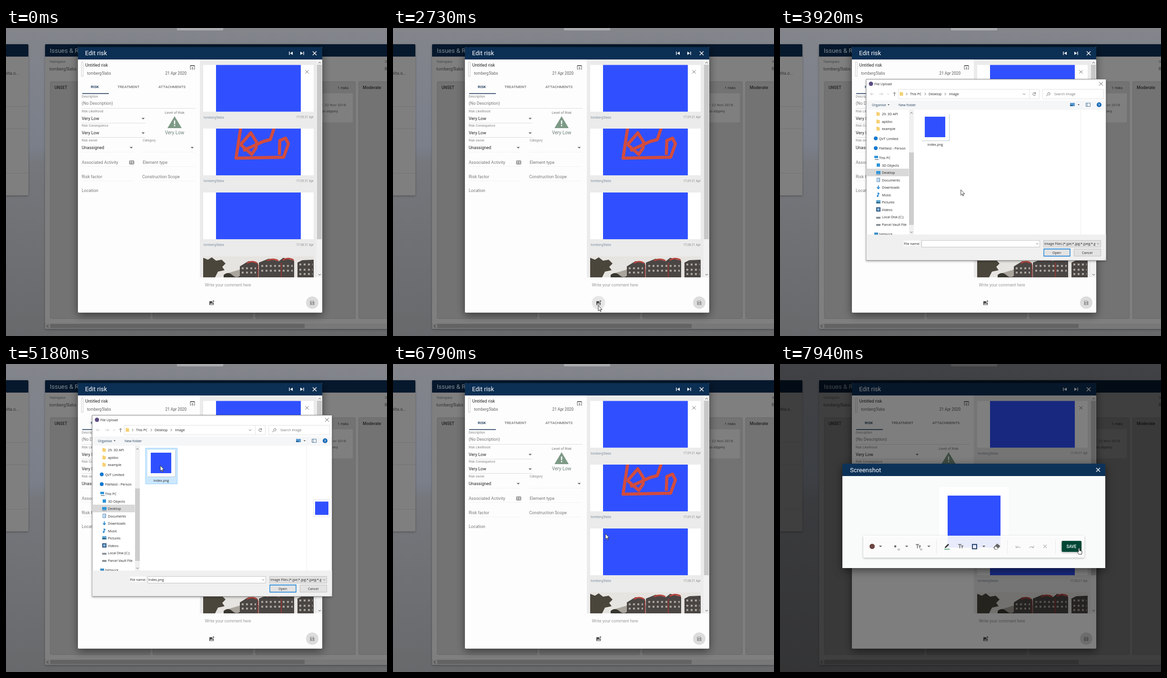
Write an HTML page that moves like this. It is 800 by 646 pixels and loops after 8000 ms.

```html
<!DOCTYPE html>
<html lang="en">
<head>
<meta charset="utf-8">
<title>Edit risk: image upload</title>
<style>
html, body { margin: 0; width: 100%; height: 100%; overflow: hidden; background: #77797f; }
svg.stage { display: block; width: 100vw; height: 100vh; }
text { font-family: Roboto, Arial, sans-serif; font-size: 9px; fill: #777; }
.h { font-size: 13px; fill: #fff; }
.lab { font-size: 6.8px; fill: #858585; }
.val { fill: #222; }
.b { font-weight: 500; }
.tab { font-size: 8px; font-weight: 500; fill: #757575; }
.by { font-size: 7px; fill: #8290a3; }
.when { font-size: 6.5px; fill: #8a8a8a; text-anchor: end; }
.os text { font-family: "Open Sans", "Noto Sans", sans-serif; font-size: 7.1px; fill: #222; }
.mid { text-anchor: middle; }
.line { fill: none; stroke: #666; stroke-width: 1; }
.rule { stroke: #dedede; }
.white { stroke: #fff; stroke-width: 1.4; fill: none; }

.dialog, .inner, .files, .hover, .picked, .halo, .focus, .tip, .scrim, .shot, .frame, .paper,
.tools, .blank, .image, .save, .arrow, .hand, .busy, .cursor {
  animation: 8s step-end infinite;
}
.dialog { animation-name: dialog; transform-origin: 433px 297px; }
.inner { animation-name: inner; }
.files { animation-name: files; }
.hover { animation-name: hover; }
.picked { animation-name: picked; }
.halo { animation-name: halo; }
.focus { animation-name: focus; }
.tip { animation-name: tip; animation-timing-function: linear; }
.scrim, .shot { animation-name: shot; }
.frame { animation-name: frame; }
.paper { animation-name: paper; }
.tools { animation-name: tools; }
.blank { animation-name: blank; }
.image { animation-name: image; }
.save { animation-name: save; }
.arrow { animation-name: arrow; }
.hand { animation-name: hand; }
.busy { animation-name: busy; }
.cursor { animation-name: cursor; animation-timing-function: ease-in-out; }

@keyframes dialog {
  0% { opacity: 0; transform: scale(.99); }
  39.125% { opacity: .93; transform: scale(.998); }
  40.625% { opacity: 1; transform: scale(1); }
  71.5% { opacity: .95; transform: scale(.995); }
  73.25% { opacity: .45; transform: scale(.98); }
  74.75% { opacity: .08; transform: scale(.96); }
  76.25%, 100% { opacity: 0; transform: scale(.95); }
}
@keyframes inner { 0% { opacity: 0; } 42.125%, 100% { opacity: 1; } }
@keyframes files { 0% { opacity: 0; } 45%, 100% { opacity: 1; } }
@keyframes hover { 0% { opacity: 0; } 52.5% { opacity: .5; } 56.25%, 100% { opacity: 1; } }
@keyframes picked { 0% { opacity: 0; } 56.25%, 100% { opacity: 1; } }
@keyframes halo {
  0% { fill: #fff0; } 11.75% { fill: #ebebeb; } 18.875% { fill: #ccc; }
  28.5% { fill: #e6e6e6; } 43%, 100% { fill: #fff0; }
}
@keyframes focus { 0% { opacity: 0; } 18.875% { opacity: 1; } 28.5%, 100% { opacity: 0; } }
@keyframes tip { 0%, 13% { opacity: 0; } 16%, 24% { opacity: 1; } 27%, 100% { opacity: 0; } }
@keyframes shot { 0% { opacity: 0; } 87.875% { opacity: .94; } 89.625%, 100% { opacity: 1; } }
@keyframes frame { 0% { transform: translateY(0); } 91.125%, 100% { transform: translateY(96px); } }
@keyframes paper { 0% { height: 385px; } 91.125%, 100% { height: 193px; } }
@keyframes tools { 0% { transform: translateY(0); } 91.125%, 100% { transform: translateY(-192px); } }
@keyframes blank { 0% { opacity: 1; } 91.125%, 100% { opacity: 0; } }
@keyframes image { 0% { opacity: 0; } 91.125%, 100% { opacity: 1; } }
@keyframes save { 0% { fill: #0a5540; } 96.5%, 100% { fill: #064735; } }
@keyframes arrow {
  0% { opacity: 0; } 2.75% { opacity: 1; } 12.5% { opacity: 0; }
  33.5% { opacity: 1; } 87.875%, 100% { opacity: 0; }
}
@keyframes hand {
  0% { opacity: 0; } 12.5% { opacity: 1; } 19.5% { opacity: 0; } 87.875%, 100% { opacity: 1; }
}
@keyframes busy { 0% { opacity: 0; } 19.5% { opacity: 1; } 33.5%, 100% { opacity: 0; } }
@keyframes cursor {
  0%, 2.7% { transform: translate(708px, 662px); }
  2.75% { transform: translate(698px, 630px); }
  6.25% { transform: translate(520px, 508px); }
  9% { transform: translate(394px, 545px); }
  11.75%, 13% { transform: translate(428px, 575px); }
  17%, 19.4% { transform: translate(431px, 577px); }
  19.5%, 42.5% { transform: translate(431px, 582px); }
  48.75% { transform: translate(380px, 340px); }
  53.5%, 64.7% { transform: translate(321px, 208px); }
  64.75%, 66.1% { transform: translate(324px, 213px); }
  68.9%, 76.25% { transform: translate(329px, 214px); }
  83.25% { transform: translate(510px, 426px); }
  84.875%, 87.8% { transform: translate(446px, 356px); }
  87.875%, 90.5% { transform: translate(478px, 354px); }
  97.75%, 100% { transform: translate(628px, 386px); }
}
</style>
</head>
<body>
<svg class="stage" viewBox="0 0 800 646" preserveAspectRatio="none">
<defs>
  <linearGradient id="sky" x2="0" y2="1">
    <stop offset="0" stop-color="#83858b"/><stop offset=".38" stop-color="#7a7f8a"/>
    <stop offset=".44" stop-color="#75777c"/><stop offset="1" stop-color="#68696b"/>
  </linearGradient>
  <filter id="deep" x="-20%" y="-20%" width="140%" height="140%"><feDropShadow dx="0" dy="5" stdDeviation="9" flood-opacity=".5"/></filter>
  <filter id="soft" x="-10%" y="-10%" width="120%" height="130%"><feDropShadow dx="0" dy="1.5" stdDeviation="2" flood-opacity=".3"/></filter>
  <clipPath id="tree"><path d="M181 172h89.500v261.500h-89.500z"/></clipPath>
  <clipPath id="types"><path d="M553 445h109v15h-109z"/></clipPath>
  <clipPath id="snap"><path d="M414 211h232v98h-232z"/></clipPath>
  <clipPath id="photo"><path d="M414 479h232v44h-232z"/></clipPath>
  <path id="caret" d="M-3.300-1.500h6.600l-3.300 3.300z" fill="#666"/>
  <path id="cross" d="M-4-4l8 8m0-8l-8 8"/>
  <path id="folder" d="M-3.500-4h3l1 1.200h3v6.800h-7z" fill="#f6cf70"/>
  <g id="card">
    <path d="M414 0h232v98h-232z" fill="#fff"/>
    <path d="M441 0h178v98h-178z" fill="#3050ff"/>
    <text class="by" x="415" y="112">tomberg5labs</text>
  </g>
  <g id="sizes">
    <path d="M-5-4h7M-1.500-4v8M1-1h5M3.500-1v5" fill="none" stroke="#666" stroke-width="1.500"/>
  </g>
</defs>

<!-- page behind -->
<rect width="800" height="646" fill="url(#sky)"/>
<path d="M359 0h97v5h-97z" fill="#a9aaad"/>
<g filter="url(#soft)">
  <rect x="-6" y="34" width="53" height="317" rx="2" fill="#7f7f7f"/>
  <rect x="82" y="34" width="730" height="597" rx="2" fill="#7f7f7f"/>
</g>
<path d="M0 34h45q2 0 2 2v24h-47zM84 34h716v26h-718v-24q0-2 2-2z" fill="#06182c"/>
<path d="M0 164.500h47M0 211.500h47M0 304.500h47" stroke="#727272"/>
<text x="-2" y="98" fill="#333" style="fill:#333">elta.o...</text>
<text class="h" x="92" y="52" style="fill:#828c97">Issues &amp; Risks</text>
<g style="--c:#3c3c3c">
  <text x="91" y="73" style="font-size:6.500px;fill:#444">Teamspace</text>
  <text x="91" y="89" style="font-size:9.200px;fill:#333">tomberg5labs</text>
  <text x="795" y="73" style="font-size:6.500px;fill:#444">Show</text>
  <text x="795" y="89" style="fill:#333">Risk</text>
</g>
<g fill="#737373" stroke="#696969">
  <rect x="93" y="112.500" width="209" height="497" rx="2"/>
  <rect x="308.500" y="112.500" width="209" height="497" rx="2"/>
  <rect x="524.500" y="112.500" width="209" height="497" rx="2"/>
  <rect x="740.500" y="112.500" width="209" height="497" rx="2"/>
</g>
<rect x="530" y="137" width="198" height="61" rx="1" fill="#7f7f7f"/>
<g>
  <text class="b" x="102" y="128" style="fill:#222;font-size:8.500px">UNSET</text>
  <text x="696" y="128" style="fill:#222;font-size:8px">1 risks</text>
  <text class="b" x="749" y="128" style="fill:#222">Moderate</text>
  <text x="714" y="164" style="fill:#3c3c3c;font-size:8px;text-anchor:end">v&#160; 22 Nov 2018</text>
  <text x="697" y="177" style="fill:#333;font-size:7px;text-anchor:end">too slippery</text>
</g>
<path d="M82 620h718v10h-718z" fill="#787878"/>
<path d="M93 620.500h534v9h-534z" fill="#636363"/>
<path d="M89 622.500l-3 3 3 3" fill="none" stroke="#222"/>

<!-- edit risk -->
<rect x="151" y="40" width="513" height="557" rx="2" fill="#fdfdfd" filter="url(#deep)"/>
<path d="M153 40h509q2 0 2 2v24h-513v-24q0-2 2-2z" fill="#0c2f54"/>
<text class="h" x="166" y="57">Edit risk</text>
<path d="M595 49.500v7M625 49.500v7" class="white"/>
<path d="M602 49.500v7l-5.500-3.500zM618 49.500v7l5.500-3.500z" fill="#fff"/>
<use href="#cross" class="white" x="648" y="53"/>

<path d="M158.500 71.500h3.500v30h-3.500z" fill="#fff" stroke="#ccc"/>
<text class="val" x="166.500" y="81">Untitled risk</text>
<text x="170" y="98" style="font-size:8.200px;fill:#666">tomberg5labs</text>
<text x="379" y="98" style="font-size:8.200px;fill:#555;text-anchor:end">21 Apr 2020</text>
<path class="line" d="M389 86.500h-2v-8h9v8h-2M387 79.500h9M391.500 88v-5m-2 1.500l2-2 2 2"/>
<text class="tab" x="178" y="126" style="fill:#12304f">RISK</text>
<text class="tab" x="234" y="126">TREATMENT</text>
<text class="tab" x="320" y="126">ATTACHMENTS</text>
<path d="M160 137.500h56" stroke="#12304f" stroke-width="1.300"/>
<text class="lab" x="159" y="146">Description</text>
<text x="159" y="161">(No Description)</text>
<text class="lab" x="159" y="177">Risk Likelihood</text>
<text class="val" x="159" y="193">Very Low</text>
<text class="lab" x="159" y="207">Risk Consequence</text>
<text class="val" x="159" y="223">Very Low</text>
<text class="lab" x="159" y="238">Risk owner</text>
<text class="lab" x="287" y="238">Category</text>
<text class="val" x="159" y="254">Unassigned</text>
<text x="159" y="285">Associated Activity</text>
<text x="287" y="285">Element type</text>
<text x="159" y="315">Risk factor</text>
<text x="286" y="315">Construction Scope</text>
<text x="159" y="344">Location</text>
<path class="rule" d="M159 168.500h239M159 199.500h134M159 229.500h134"/>
<path d="M159 260.500h110M286 260.500h111M159 290.500h110M286 290.500h111M159 320.500h110M286 320.500h111" stroke="#f3f3f3"/>
<use href="#caret" x="288" y="190"/><use href="#caret" x="288" y="220.500"/>
<use href="#caret" x="263" y="251"/><use href="#caret" x="391" y="251"/>
<path d="M259.500 278.500h9v7h-9zM264.500 278.500v7M259.500 281h5m-5 2.500h5M266 281h2m-2 2h2" class="line" stroke-width=".8"/>
<text class="mid" x="354" y="180" style="font-size:7.400px">Level of Risk</text>
<path d="M354 185l15 25h-30z" fill="#7d9a86"/>
<path d="M354 194v7.500M354 203.500v2.500" stroke="#fff" stroke-width="2.500"/>
<text class="mid" x="354" y="223" style="font-size:10px;fill:#6f8376">Very Low</text>

<!-- comments -->
<path d="M407 66h245v457h-245z" fill="#ebebeb"/>
<path d="M652 66h12v457h-12z" fill="#f1f1f1"/>
<path d="M653 77h10v366h-10z" fill="#c8c8c8"/>
<path d="M656 74l2.500-2.500 2.500 2.500M656 516l2.500 2.500 2.500-2.500" fill="none" stroke="#444"/>
<use href="#card" y="77.500"/><use href="#card" y="211"/><use href="#card" y="345"/>
<text class="when" x="646" y="189">17:29 21 Apr</text>
<text class="when" x="646" y="323">17:29 21 Apr</text>
<text class="when" x="646" y="457">17:28 21 Apr</text>
<use href="#cross" class="line" x="632" y="92" transform="translate(632 92) scale(.9) translate(-632 -92)"/>
<path clip-path="url(#snap)" d="M493 208L483 273 583 271 593 243 587 231 575 236 574 266M493 244L514 220 526 239 525 252 516 265 492 244M498 257L540 238 555 234 564 207" fill="none" stroke="#d24c3e" stroke-width="6.500" stroke-linejoin="round"/>
<g clip-path="url(#photo)">
  <path d="M414 479h232v44h-232z" fill="#e6e4e0"/>
  <path d="M463 515l30-9h50v17h-80z" fill="#a9a49c"/>
  <path d="M414 482l10 4 8-5 9 7 12-2 8 8-7 7 5 7-14 3-6 12h-25z" fill="#4b463c"/>
  <path d="M491 500l18-11 20 4v30h-38zM531 492l20-8 22 5 9-7 23 6v35h-74zM612 492l10-5 24-1v37h-34z" fill="#4a4644"/>
  <path d="M506 493q11-6 21 0M548 488q12-6 24 0M581 487q12-7 23 0" fill="none" stroke="#b8443e" stroke-width="3"/>
  <path d="M495 504h30M495 513h30M536 499h66M536 509h66M616 496h28M616 507h28M616 516h28" stroke="#aaa49b" stroke-width="4" stroke-dasharray="4 5"/>
  <path d="M578 492v31M529 496v27" stroke="#8d3936" stroke-width="2"/>
  <path d="M457 518q9-8 18 0t16 2v3h-34z" fill="#38372f"/>
</g>
<text x="417.500" y="542" style="font-size:8.700px;fill:#999">Write your comment here</text>
<circle class="halo" cx="431.500" cy="576" r="14" fill="none"/>
<path class="focus" d="M417.500 562v27" stroke="#444" stroke-dasharray="3 1.500"/>
<path d="M427 573h6v3h3v5h-9z" fill="#505050"/>
<path d="M428 580l2-2.500 1.500 1.500 1.500-2 2 3z" fill="#fff"/>
<path d="M435.500 571v4m-2-2h4" stroke="#505050" stroke-width="1.200"/>
<circle cx="643" cy="576" r="13" fill="#dcdcdc"/>
<path d="M638.500 572h7l2 2v7h-9z" fill="#999"/>
<path d="M640 573h5v2h-5z" fill="#dcdcdc"/><circle cx="643" cy="578.500" r="1.500" fill="#dcdcdc"/>
<g class="tip">
  <rect x="407" y="590" width="49.500" height="12" rx="2" fill="#5c5c5c"/>
  <text class="mid" x="431.500" y="599" style="font-size:6.800px;fill:#fff">Upload image</text>
</g>

<!-- file upload -->
<g class="dialog os">
  <g filter="url(#soft)"><path d="M181 107.500h503.500v380h-503.500z" fill="#fff" stroke="#8b8b8b"/></g>
  <path d="M181.500 433h503v54h-503z" fill="#f0f0f0"/>
  <path d="M260 446h34v11h-34zM297 445h248v14h-248zM553 445h120v14h-120zM553 463h56v16h-56zM617 463h56v16h-56z" fill="#fff"/>
  <circle cx="191" cy="117" r="4.500" fill="#5a4c82"/>
  <text x="198" y="120">File Upload</text>
  <use href="#cross" class="line" x="674" y="117" stroke-width=".9"/>
  <g class="inner">
    <path d="M197 138.500h-7m3-3l-3 3 3 3M208 138.500h8m-3-3l3 3-3 3" fill="none" stroke="#c4c4c4"/>
    <path d="M225 137.500l2 2 2-2" fill="none" stroke="#bbb"/>
    <path d="M240.500 143v-8m-3 3l3-3 3 3" class="line"/>
    <path d="M248.500 128.500h296v20h-296zM523.500 128.500v20M551.500 128.500h128v20h-128z" fill="none" stroke="#e2e2e2"/>
    <use href="#folder" x="255" y="138"/>
    <path d="M265 136l2 2.500-2 2.500M304 136l2 2.500-2 2.500M346 136l2 2.500-2 2.500M510 137.500l2.500 2.500 2.500-2.500M536.500 137a3 3 0 1 0 .3 2.500m-.3-4.500v2.500h-2.500" class="line"/>
    <text x="273" y="141">This PC</text><text x="312" y="141">Desktop</text><text x="355" y="141">Image</text>
    <path d="M559.500 143l3-3.500a2.500 2.500 0 1 1 1 .8" class="line" stroke-width=".8"/>
    <text x="576" y="141" style="fill:#777">Search Image</text>
    <path d="M182 152h502v19.500h-502z" fill="#f5f6f7"/>
    <text x="193" y="164" style="fill:#24405f">Organise</text><text x="249" y="164" style="fill:#24405f">New folder</text>
    <path d="M226 160h4l-2 2.300zM625 160h4l-2 2.300z" fill="#444"/>
    <path d="M609 157h10v7h-10z" fill="#5d9bd3"/><path d="M609 161h6v3h-6z" fill="#2c6a9e"/>
    <path d="M642.500 157.500h9v7h-9zM645 157.500v7" fill="none" stroke="#557ca0"/>
    <circle cx="670" cy="161" r="5" fill="#1769b5"/>
    <text class="mid" x="670" y="163.500" style="fill:#fff;font-weight:700">?</text>
    <g clip-path="url(#tree)">
      <path d="M181 295h90v16h-90z" fill="#d9d9d9"/>
      <use href="#folder" x="206" y="180"/><use href="#folder" x="206" y="196"/><use href="#folder" x="206" y="211"/>
      <circle cx="201" cy="231.500" r="4" fill="#1479cf"/><circle cx="201" cy="252" r="4" fill="#1479cf"/>
      <path d="M198 268h8v5h-8zM202 300h9v6h-9zM203 284h7v7h-7z" fill="#3095d8"/>
      <path d="M199 275h8v1.500h-8zM202 307h9v1h-9z" fill="#707d88"/>
      <path d="M203.500 314.500h6v8h-6zM205 317h4M205 320h4" fill="#fff" stroke="#4a87bd"/>
      <path d="M206.500 330v7m-3-3l3 3 3-3M206 353v-7l3 2" fill="none" stroke="#1c81cc" stroke-width="1.700"/>
      <circle cx="205" cy="352.500" r="1.800" fill="#1c81cc"/>
      <path d="M202 361h9v7h-9z" fill="#65a9d7"/><path d="M202 366l3-2 6 2v2h-9z" fill="#326d87"/>
      <path d="M202 376h9v9h-9z" fill="#345a83"/><path d="M204 378h5v5h-5z" fill="#86b7db"/>
      <path d="M202 396h9v4h-9zM202 411h9v4h-9z" fill="#8b9298"/>
      <path d="M198 429h8v5h-8z" fill="#3c8fc8"/>
      <text x="214" y="183">29. 3D API</text><text x="214" y="198.500">apidoc</text><text x="214" y="214">example</text>
      <text x="208" y="234.500">QVT Limited</text><text x="208" y="255">FileNest - Person</text>
      <text x="208" y="275">This PC</text><text x="214" y="291">3D Objects</text><text x="214" y="306">Desktop</text>
      <text x="214" y="322">Documents</text><text x="214" y="337">Downloads</text><text x="214" y="352.500">Music</text>
      <text x="214" y="368">Pictures</text><text x="214" y="383.500">Videos</text><text x="214" y="399">Local Disk (C:)</text>
      <text x="214" y="414.500">Parcel Vault File</text><text x="208" y="434.500">Network</text>
    </g>
    <path d="M271 172h10v261h-10z" fill="#f0f0f0"/><path d="M271 261h10v152h-10z" fill="#cdcdcd"/>
    <path d="M273.500 179.500l2.500-2.500 2.500 2.500M273.500 427l2.500 2.500 2.500-2.500" class="line"/>
    <path d="M631.500 172v261" stroke="#ececec"/>
    <text x="294" y="455" style="text-anchor:end">File name:</text>
    <path d="M297.500 445.500h248v14h-248z" fill="#fff" stroke="#b5b5b5" stroke-width=".8"/>
    <path d="M553.500 445.500h120v14h-120zM617.500 463.500h56v15h-56z" fill="#e3e3e3" stroke="#b5b5b5" stroke-width=".8"/>
    <path d="M554 463.500h55v15h-55z" fill="#e3e3e3" stroke="#0078d7" stroke-width="1.300"/>
    <path d="M538 451.500l2 2 2-2M666 451.500l2 2 2-2" class="line" stroke-width=".8"/>
    <g clip-path="url(#types)"><text x="555" y="455">Image Files (*.jpe;*.jpg;*.jpeg;*.gif)</text></g>
    <text class="mid" x="581" y="474">Open</text><text class="mid" x="645" y="474">Cancel</text>
    <path d="M683 482v4h-4" fill="none" stroke="#bbb" stroke-dasharray="1 1"/>
  </g>
  <g class="files">
    <path class="hover" d="M293 176.500h66.500v75h-66.500z" fill="#cce8ff" stroke="#99d1ff"/>
    <path d="M298 181h58v56h-58z" fill="#b9c6d0"/><path d="M297 180h58v56h-58z" fill="#fff"/>
    <path d="M304 186h43v43h-43z" fill="#3050ff"/>
    <text class="mid" x="326" y="247">index.png</text>
  </g>
  <g class="picked">
    <text x="299" y="455">index.png</text>
    <path d="M645.500 284.500h35v36h-35z" fill="#fff" stroke="#e4e4e4"/>
    <path d="M649 288.500h28v28h-28z" fill="#3050ff"/>
  </g>
</g>

<!-- screenshot editor -->
<rect class="scrim" width="800" height="646" fill="#000" fill-opacity=".5"/>
<g class="shot"><g class="frame">
  <g filter="url(#deep)">
    <rect class="paper" x="131" y="139" width="552" height="385" fill="#f9fbfb"/>
    <path d="M133 113h548q2 0 2 2v24h-552v-24q0-2 2-2z" fill="#0c3058"/>
  </g>
  <text class="h" x="147" y="131">Screenshot</text>
  <use href="#cross" class="white" x="668" y="126"/>
  <path class="blank" d="M411 329h1v1h-1z" fill="#444"/>
  <g class="image">
    <path d="M334 162h146v146h-146z" fill="#fff"/>
    <path d="M352 180h111v109h-111z" fill="#3050ff"/>
  </g>
  <g class="tools">
    <rect x="175" y="456" width="464" height="46" rx="2" fill="#fff" fill-opacity=".88" filter="url(#soft)"/>
    <circle cx="193.500" cy="478.500" r="5.500" fill="#6b4643"/>
    <circle cx="242" cy="478.500" r="2.300" fill="#666"/>
    <use href="#caret" x="211" y="478.500"/><use href="#caret" x="266" y="478.500"/>
    <use href="#caret" x="312.500" y="478.500"/><use href="#caret" x="428" y="478.500"/>
    <use href="#sizes" x="290" y="478.500"/><use href="#sizes" x="379" y="478.500"/>
    <text x="247" y="487" style="font-size:5.500px">M</text><text x="294" y="487" style="font-size:5.500px">M</text>
    <path d="M328.500 464v30M477.500 464v30M578.500 464v30" stroke="#e9e9e9"/>
    <path d="M346 482l.5-2.500 6.500-6.500 2 2-6.500 6.500z" fill="#333"/>
    <path d="M345 484.500h11.500" stroke="#58a887" stroke-width="1.800"/>
    <path d="M404 474.500h9v9h-9z" fill="none" stroke="#173562" stroke-width="1.800"/>
    <path d="M448 481l8-8.500 6.500 5.500-7 7.500h-4z" fill="#666"/><path d="M450 481.500l3-3 4.500 4-2 2h-3z" fill="#fff"/>
    <path d="M504.500 482q-3-5-8-1.500M495.500 477v4h4M523.500 482q3-5 8-1.500M532.500 477v4h-4M553 475l7 7m0-7l-7 7" fill="none" stroke="#b5b8bb" stroke-width="1.300"/>
    <rect class="save" x="591.500" y="467" width="41.500" height="23" rx="2" filter="url(#soft)"/>
    <text class="b mid" x="612" y="482" style="font-size:8.500px;fill:#fff">SAVE</text>
  </g>
</g></g>

<g class="cursor" fill="#fff" stroke="#222" stroke-width=".9">
  <path class="arrow" d="M0 0v11.500l2.600-2.400 1.700 3.900 1.700-.7-1.700-3.800h3.700z"/>
  <path class="hand" d="M-1.200 1.300q0-1.300 1.100-1.300t1.100 1.300v4l4 1q1.300.4 1.100 1.800l-.8 5h-5.800l-3.500-5q.4-1.200 1.700-.4l1.100.8z"/>
  <g class="busy">
    <path d="M-3-7h5v4h-5z" fill="#555" stroke="none"/>
    <circle cy="-1.500" r="4.600" stroke="#2a93dc" stroke-width="2.400"/>
  </g>
</g>
</svg>
</body>
</html>
```
